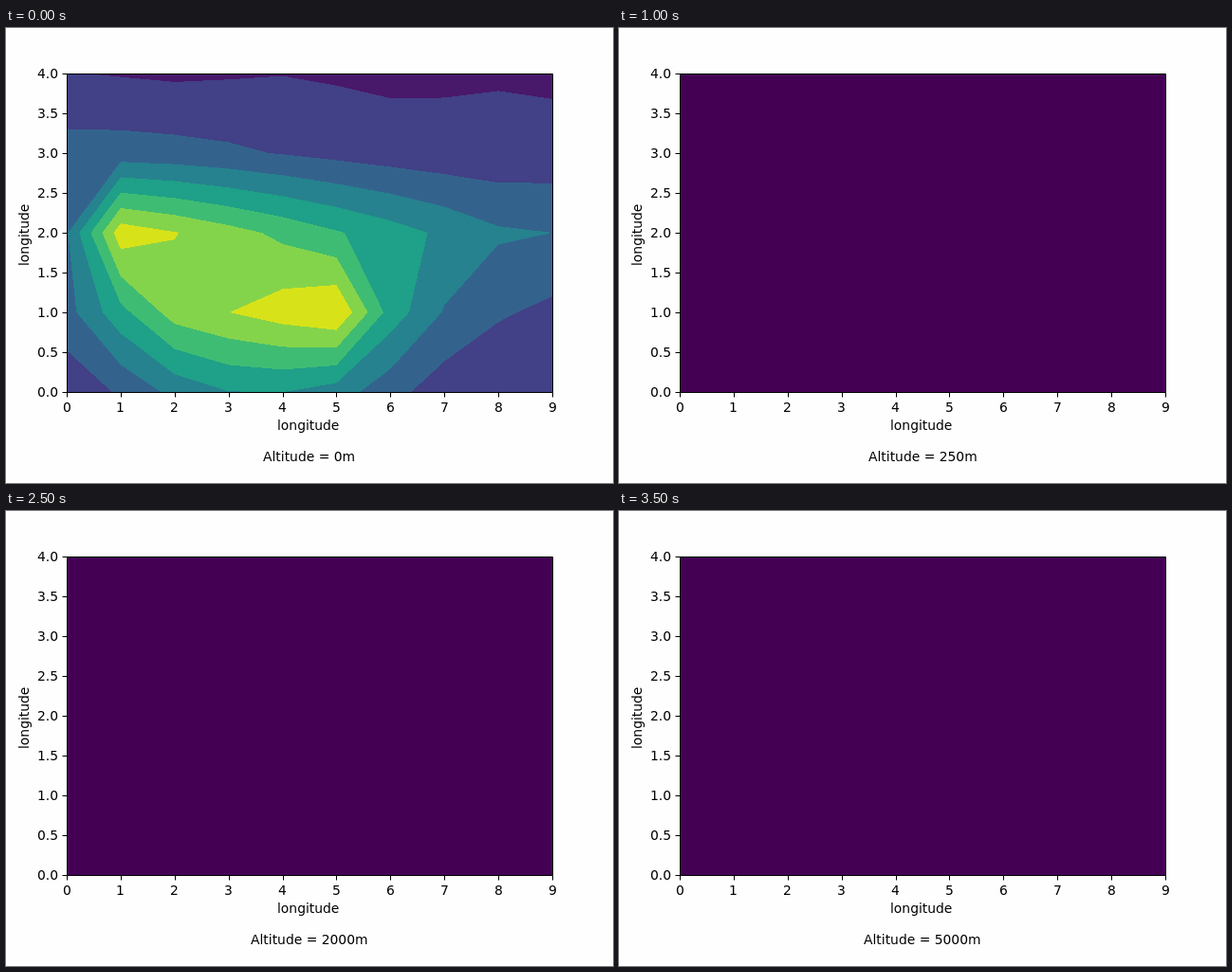
Recreate the animation shown at these times as an HTML page. Size 640 px wide and 480 px high, loop 4000 ms.

```html
<!DOCTYPE html>
<html lang="en">
<head>
<meta charset="utf-8">
<title>Contours by altitude</title>
<style>
  html, body { margin: 0; width: 640px; height: 480px; overflow: hidden; background: #fefefe; }
  svg { display: block; }
  text { font: 13.89px "DejaVu Sans", sans-serif; }
</style>
</head>
<body>
<svg id="stage" width="640" height="480" viewBox="0 0 640 480"></svg>
<script>
const altitudes = [0, 50, 250, 500, 1000, 2000, 3000, 5000];
const stepMs = 500;

const { min, max, cos, exp, abs, round, PI } = Math;
const bump = (x, center, width, height) => height * exp(-(abs((x - center) / width) ** 2.6));
const ripple = x => cos(x * PI / 2);

// One profile along x for each grid line, from y = 0 up to y = 4.
const fields = [
  {
    levels: [1, 2, 3, 4, 5, 6, 7],
    colors: ['#48186a', '#424086', '#33638d', '#26828e', '#1fa088', '#3fbc73', '#84d44b', '#d8e219'],
    profiles: [
      x => 1.02 + bump(x, 3.6, 2.6, 3.02),
      x => min(2.63 + 2.05 * x, 5.4 + 0.53 * x, 1.4 + 6.6 * 0.48 ** (x - 5)),
      x => min(2.9 + 4.7 * x, max(3, 8.35 - 0.65 * x)),
      x => 1.88 + 0.56 * cos(0.44 * x - 0.3),
      x => 0.95 - 0.015 * x + 0.08 * ripple(x)
    ]
  },
  {
    levels: [0, 2, 3, 5, 6],
    colors: ['#450457', '#481769', '#482777', '#453882', '#3e4a89', '#3a528b'],
    profiles: [
      x => bump(x, 3.7, 3.1, 2.5) - 0.1,
      x => min(2.6 + 1.24 * x, 5 + 0.23 * x, max(0.3, 15.65 - 1.8 * x)),
      x => x < 5 ? min(2.24 + 3.3 * x, 5.525 - 0.53 * cos(2.5 * x - 5)) : 2.6 + 0.53 * cos(x - 5),
      x => 0.87 + bump(x, 4, 1.35, 2),
      x => 0.25 * ripple(x) - 0.05
    ]
  },
  { levels: [], colors: ['#440154'], profiles: [] }
];

const stage = document.getElementById('stage');
const xAt = i => 64 + i * 512 / 9;
const yAt = j => 384 - j * 84;

function add(parent, tag, attrs) {
  const node = document.createElementNS(stage.namespaceURI, tag);
  for (const key in attrs) node.setAttribute(key, attrs[key]);
  return parent.appendChild(node);
}

// Centres text on x, starting on a whole pixel.
function setText(node, text, x) {
  node.textContent = text;
  node.setAttribute('x', round(x - node.getComputedTextLength() / 2));
}

function label(text, x, y, attrs) {
  const node = add(stage, 'text', { y, ...attrs });
  setText(node, text, x);
  return node;
}

const polygon = points => `M${points.map(p => p.map(n => n.toFixed(2))).join('L')}Z`;

// Outline of the part of one grid cell that lies at or above a level.
function cellPath(profiles, i, j, level) {
  const corners = [[i, j], [i + 1, j], [i + 1, j + 1], [i, j + 1]]
    .map(([c, r]) => ({ x: xAt(c), y: yAt(r), v: profiles[r](c) }));
  const high = corners.map(c => c.v >= level);
  const cross = k => {
    const a = corners[k], b = corners[(k + 1) % 4];
    const t = (level - a.v) / (b.v - a.v);
    return [a.x + t * (b.x - a.x), a.y + t * (b.y - a.y)];
  };
  const mean = corners.reduce((sum, c) => sum + c.v, 0) / 4;
  const saddle = high[0] === high[2] && high[1] === high[3] && high[0] !== high[1];
  if (saddle && mean < level) {
    return corners.map((c, k) =>
      high[k] ? polygon([cross((k + 3) % 4), [c.x, c.y], cross(k)]) : '').join('');
  }
  const points = [];
  corners.forEach((c, k) => {
    if (high[k]) points.push([c.x, c.y]);
    if (high[k] !== high[(k + 1) % 4]) points.push(cross(k));
  });
  return points.length ? polygon(points) : '';
}

function drawField({ levels, colors, profiles }) {
  const group = add(stage, 'g', { 'shape-rendering': 'crispEdges' });
  add(group, 'rect', { x: 64, y: 48, width: 512, height: 336, fill: colors[0] });
  levels.forEach((level, n) => {
    let d = '';
    for (let j = 0; j < 4; j++)
      for (let i = 0; i < 9; i++) d += cellPath(profiles, i, j, level);
    add(group, 'path', { d, fill: colors[n + 1] });
  });
  return group;
}

const groups = fields.map(drawField);

let axes = 'M64.5 48.5H576.5V384.5H64.5Z';
for (let i = 0; i < 10; i++) {
  axes += `M${round(xAt(i)) + 0.5} 384.5v5`;
  label(i, xAt(i), 405);
}
for (let j = 0; j <= 4; j += 0.5) {
  axes += `M64.5 ${yAt(j) + 0.5}h-5`;
  label(j.toFixed(1), 44, yAt(j) + 5);
}
add(stage, 'path', { d: axes, fill: 'none', stroke: '#000' });
label('longitude', 319, 424);
label('longitude', 0, 0, { transform: 'translate(24 218) rotate(-90)' });
const caption = label('', 320, 457);

function draw() {
  const step = Math.floor(performance.now() / stepMs) % altitudes.length;
  const shown = min(step, groups.length - 1);
  groups.forEach((g, k) => g.setAttribute('visibility', k === shown ? 'visible' : 'hidden'));
  setText(caption, `Altitude = ${altitudes[step]}m`, 320);
  requestAnimationFrame(draw);
}
draw();
</script>
</body>
</html>
```
